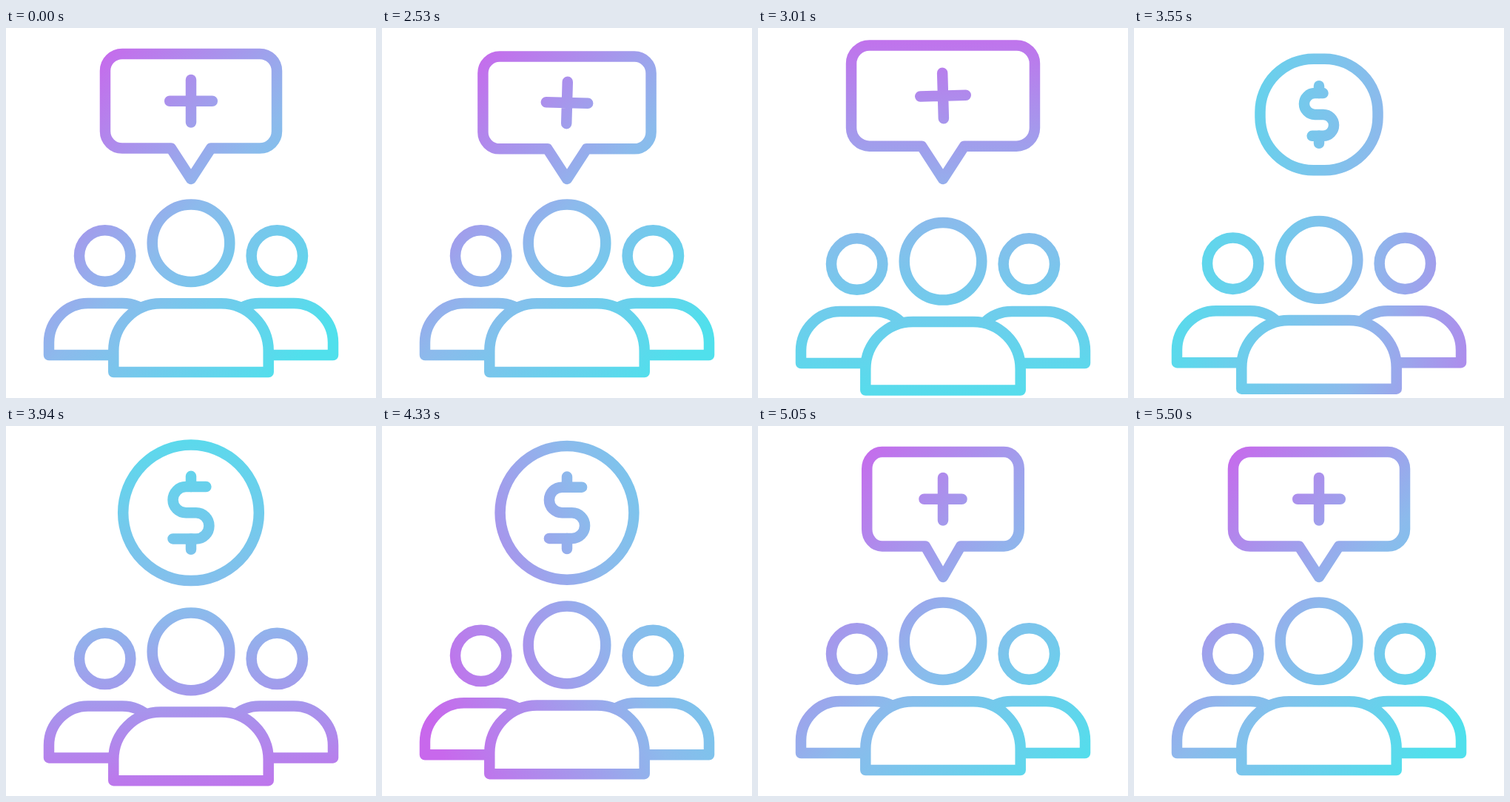
Recreate the animation shown at these times as an HTML page with a canvas. Size 500 by 500 pixels, loop 5.53 s.

```html
<!DOCTYPE html>
<html lang="en">
<head>
<meta charset="utf-8">
<title>Group benefits</title>
<style>
  html, body { margin: 0; height: 100%; overflow: hidden; background: #fff; }
  canvas { display: block; width: 100vw; height: 100vh; }
</style>
</head>
<body>
<canvas id="stage" width="500" height="500"></canvas>
<script>
const ctx = document.getElementById('stage').getContext('2d');
const LOOP = 5530, START = 2530, STEP = 30;
const COLORS = ['#c868ec', '#8cbaec', '#50e0ec'];

const lerp = (a, b, k) => a + (b - a) * k;
// Eased 0 to 1 between times a and b
const ramp = (t, a, b) => {
  const k = Math.min(1, Math.max(0, (t - a) / (b - a)));
  return k * k * (3 - 2 * k);
};
// Rises from a to b, falls from c to d
const pulse = (t, a, b, c, d) => ramp(t, a, b) * (1 - ramp(t, c, d));

const bob = t => 26 * pulse(t, 2520, 3090, 3190, 4790);
// Dips, pops up, dips again while turning into the coin, then settles
const size = t => 1
  - .22 * pulse(t, 2490, 2700, 2700, 3000) + .07 * ramp(t, 2800, 3030)
  - .32 * pulse(t, 3080, 3400, 3400, 3700) - .05 * ramp(t, 3080, 3400)
  - .055 * ramp(t, 4050, 4850);
// Negative once the coin has turned over into the bubble
const flip = t => Math.cos(Math.PI * ramp(t, 4290, 5300));

// One full turn of the gradient; it drifts and widens on the way
function gradient(t) {
  const a = (43 + 360 * ramp(t, 2440, 5000)) * Math.PI / 180;
  const moving = pulse(t, 2500, 3300, 4700, 5500);
  const rate = .00205 - .0003 * moving;
  const mid = .5 - .12 * Math.cos(a) * moving;
  const at = k => [250 + Math.cos(a) * (k - mid) / rate, 250 + Math.sin(a) * (k - mid) / rate];
  const g = ctx.createLinearGradient(...at(0), ...at(1));
  COLORS.forEach((color, i) => g.addColorStop(i / 2, color));
  return g;
}

// Builds a path in a moved and scaled space; the line keeps its width
function draw(x, y, sx, sy, build, turn = 0) {
  ctx.save();
  ctx.translate(x, y);
  ctx.scale(sx, sy);
  ctx.rotate(turn);
  ctx.beginPath();
  build();
  ctx.restore();
  ctx.stroke();
}

function head(x, y, r) {
  ctx.beginPath();
  ctx.arc(x, y, r, 0, 7);
  ctx.stroke();
}

function torso(x, y, half, height, r) {
  ctx.beginPath();
  ctx.moveTo(x - half, y);
  ctx.arcTo(x - half, y - height, x, y - height, r);
  ctx.arcTo(x + half, y - height, x + half, y, r);
  ctx.lineTo(x + half, y);
  ctx.closePath();
  ctx.fill();
  ctx.stroke();
}

function people(y) {
  const side = y * .45;
  for (const d of [-1, 1]) {
    torso(250 + d * 116, 442 + side, 76, 70, 53);
    head(250 + d * 116.3, 308 + side, 34.7);
  }
  torso(250, 465 + y, 104.7, 92.7, 64);
  head(250, 290.7 + y, 52.3);
}

function frame(w, h, r, tailHalf, tail) {
  ctx.moveTo(-tailHalf, h);
  ctx.arcTo(-w, h, -w, 0, r);
  ctx.arcTo(-w, -h, 0, -h, r);
  ctx.arcTo(w, -h, w, 0, r);
  ctx.arcTo(w, h, 0, h, r);
  ctx.lineTo(tailHalf, h);
  if (tail > 0) ctx.lineTo(0, h + tail);
  ctx.closePath();
}

function plus() {
  ctx.moveTo(-28.8, 0);
  ctx.lineTo(28.8, 0);
  ctx.moveTo(0, -28.8);
  ctx.lineTo(0, 28.8);
}

// The S grows out of its middle as shown goes from 0 to 1
function dollar(y, sx, sy, shown) {
  const length = 179 * sy, bar = 34.5 + 14 * shown;
  if (shown < 1) {
    ctx.setLineDash([length * shown, length * 2]);
    ctx.lineDashOffset = -length * (1 - shown) / 2;
  }
  draw(250, y, sx, sy, () => {
    ctx.moveTo(20, -34.5);
    ctx.arc(-6.7, -17.25, 17.25, -Math.PI / 2, Math.PI / 2, true);
    ctx.arc(6.7, 17.25, 17.25, -Math.PI / 2, Math.PI / 2);
    ctx.lineTo(-24, 34.5);
  });
  ctx.setLineDash([]);
  draw(250, y, sx, sy, () => {
    for (const d of [-1, 1]) {
      ctx.moveTo(0, d * 34.5);
      ctx.lineTo(0, d * bar);
    }
  });
}

function badge(t) {
  const turn = flip(t), back = turn < 0, sx = Math.abs(turn);
  const s = back ? 1 : size(t);
  const morph = back ? 0 : ramp(t, 3080, 3660);
  const tail = Math.max(0, 1 - 1.2 * morph) * s;
  const radius = 90 * s;
  const w = lerp(116 * s, radius, morph), h = lerp(63.75 * s, radius, morph);
  const y = lerp(204 - 105.25 * s, 117.3, morph);
  draw(250, y, sx, 1, () => frame(w, h, lerp(23 * s, radius, morph), 27 * tail, 41.5 * tail));

  const cross = back ? 1 : 1 - ramp(t, 3060, 3270);
  const spin = back ? 0 : Math.PI * ramp(t, 2500, 3040);
  if (cross > 0) draw(250, y, sx * s * cross, s * cross, plus, spin);

  const shown = ramp(t, 3240, 3650);
  if (!back && shown > 0) dollar(y, sx * Math.min(w, h) / 90, h / 90, shown);
}

function render(t) {
  ctx.fillStyle = '#fff';
  ctx.fillRect(0, 0, 500, 500);
  ctx.strokeStyle = gradient(t);
  ctx.lineWidth = 14.5;
  ctx.lineCap = ctx.lineJoin = 'round';
  people(bob(t));
  badge(t);
}

const origin = performance.now();
function tick() {
  const t = (performance.now() - origin) % LOOP;
  render(t < START ? 0 : START + STEP * Math.floor((t - START) / STEP));
  requestAnimationFrame(tick);
}
tick();
</script>
</body>
</html>
```
